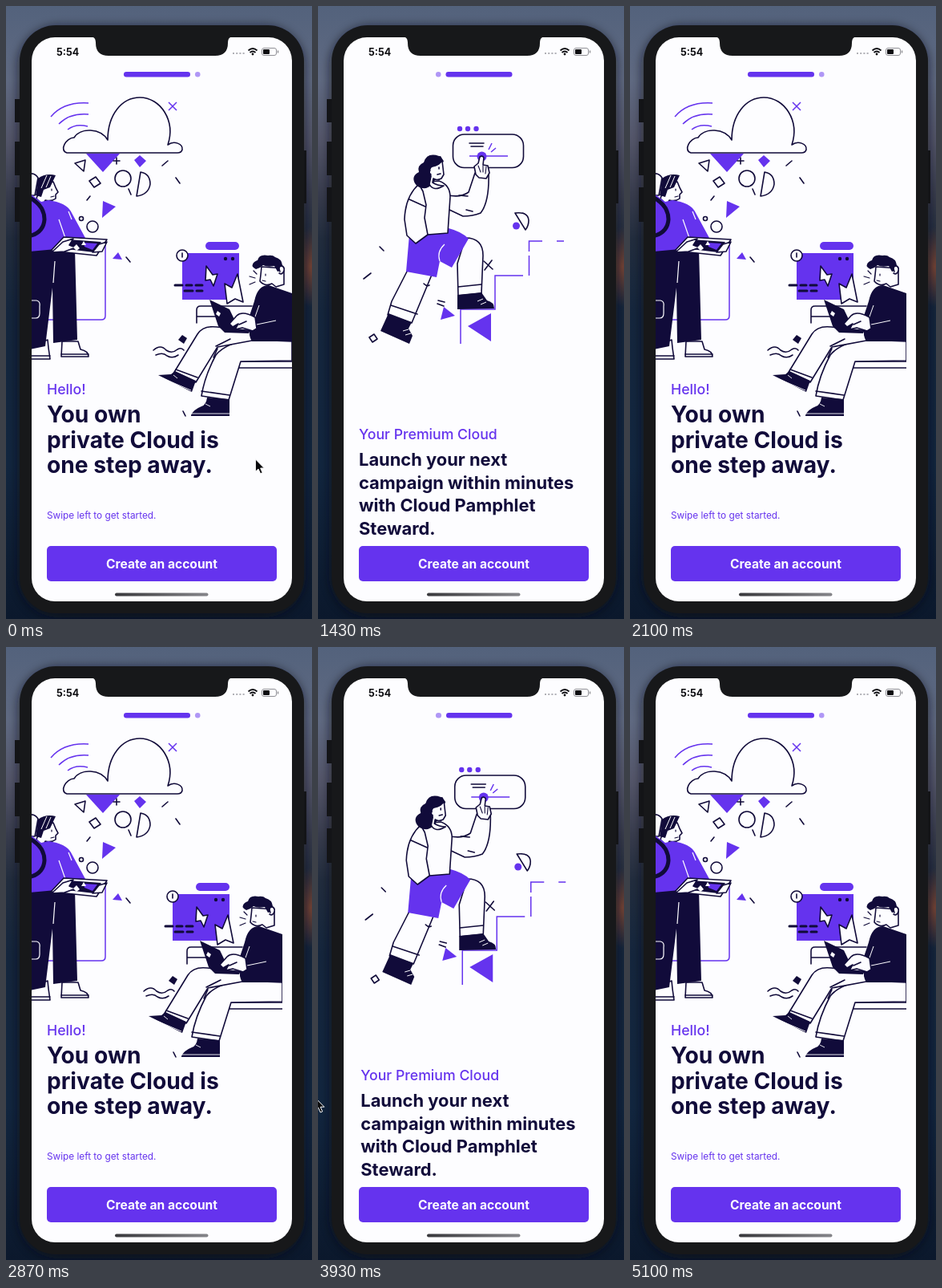
An HTML page for the animation above (5.17 s loop, 382 by 764 pixels).

```html
<!DOCTYPE html>
<html lang="en">
<head>
<meta charset="utf-8">
<title>Onboarding swipe</title>
<style>
  html, body { margin: 0; width: 100%; height: 100%; overflow: hidden; background: #14243c; }
  svg { display: block; width: 382px; height: 764px; font-family: Inter, sans-serif; }
  .line { fill: none; stroke: #110b3a; stroke-width: 1.6; stroke-linecap: round; stroke-linejoin: round; }
  .shape { fill: #fdfdff; stroke: #110b3a; stroke-width: 1.6; stroke-linejoin: round; }
  .ink { fill: #110b3a; }
  .violet { fill: #6533ee; }
  .trace { fill: none; stroke: #6533ee; stroke-width: 1.5; }
  .paper { fill: none; stroke: #fdfdff; stroke-width: 1.2; }
  .white { fill: #fdfdff; }
  .title { font-weight: 700; font-size: 28.2px; fill: #110b3a; }
  .copy { font-weight: 700; font-size: 21.9px; fill: #110b3a; }
  .lead { font-weight: 500; font-size: 17.7px; fill: #6533ee; }
</style>
</head>
<body>
<svg viewBox="0 0 382 764">
  <defs>
    <linearGradient id="sky" x2="0" y2="1">
      <stop offset="0" stop-color="#53627c"/>
      <stop offset=".12" stop-color="#606a82"/>
      <stop offset=".22" stop-color="#535569"/>
      <stop offset=".31" stop-color="#373b4c"/>
      <stop offset=".38" stop-color="#222d3e"/>
      <stop offset=".5" stop-color="#15263d"/>
      <stop offset=".75" stop-color="#12263f"/>
      <stop offset="1" stop-color="#0b182c"/>
    </linearGradient>
    <linearGradient id="metal">
      <stop offset="0" stop-color="#38383c"/>
      <stop offset="1" stop-color="#85858a"/>
    </linearGradient>
    <radialGradient id="glow">
      <stop offset="0" stop-color="#8a4a34"/>
      <stop offset="1" stop-color="#8a4a34" stop-opacity="0"/>
    </radialGradient>
    <filter id="blur"><feGaussianBlur stdDeviation="6"/></filter>
    <clipPath id="screen"><rect x="32" y="39" width="325" height="703" rx="29"/></clipPath>
    <clipPath id="seat"><path d="M170 280H357V530H170Z"/></clipPath>
  </defs>

  <rect width="382" height="764" fill="url(#sky)"/>
  <ellipse cx="380" cy="325" rx="22" ry="50" fill="url(#glow)" opacity=".8"/>
  <rect x="14" y="24" width="360" height="738" rx="52" fill="#0b0d12" opacity=".55" filter="url(#blur)"/>
  <path d="M11 116h8v29h-8zM11 169h8v42h-8zM11 226h8v43h-8zM369 180h6v66h-6z" fill="#131417"/>
  <rect x="17" y="24" width="355" height="733" rx="45" fill="#17181a"/>
  <rect x="32" y="39" width="325" height="703" rx="29" class="white"/>

  <g clip-path="url(#screen)">
    <g id="first">
      <!-- cloud and falling shapes -->
      <path class="line" d="M76 183C66 180 75 164 85 164C93 151 118 152 127 167C127 135 145 114 167 114C193 114 212 143 202 173C210 167 221 172 220 179Q219 183 214 183Z"/>
      <path class="trace" d="M56 138Q72 119 103 121M66 147Q80 133 103 135M77 154Q87 146 102 150M203 120l10 10M213 120l-10 10"/>
      <path class="violet" d="M100 184h42l-21 23zM160 192l7-6 8 7-8 8zM121 243l16 7-17 14zM133 315l7-8 5 9z"/>
      <path class="line" d="M86 196l13-4-2 14zM104 218l8-5 6 8-8 5zM168 207Q180 209 180 222Q178 235 163 237ZM134 193h8M138 189v8M195 199l7-6M212 214l5 7M153 228l3 7M101 242l4-5M150 313l5 6"/>
      <circle class="line" cx="146" cy="215" r="10"/>
      <circle class="line" cx="108" cy="275" r="7"/>
      <circle class="line" cx="94" cy="265" r="2.5"/>

      <!-- standing figure -->
      <path class="trace" d="M124 298V386q0 5-5 5H32"/>
      <path class="shape" d="M30 424l22-8 1 10 2 14H30zM70 418h20l3 10q10 2 10 9H69z"/>
      <path class="line" d="M69 434h34M30 436h25"/>
      <path class="ink" d="M30 303h56l3 113-30 4-1-69-9 73-19 4z"/>
      <path class="paper" d="M59 345l2-27M30 367h8q5 1 4 7v9q0 6-5 6h-7"/>
      <path class="shape" d="M30 209q6-1 10 5l-4 22h-6z"/>
      <path class="shape" d="M44 222l15-3q3 8 6 13l-3 3v5q-5 4-13 2l-3 6-8-8z"/>
      <path class="line" d="M57 228v2M56 238l4-1" style="stroke-width:1.2"/>
      <path class="ink" d="M37 236l3-21q9-7 22-4l-7 15-8 3-3 9z"/>
      <path class="paper" d="M44 227l7-16M50 226l6-14" style="stroke-width:1"/>
      <path class="violet" d="M30 234l14 10 9-2q22 3 28 14l18 33-23 9-14 5-32 3z"/>
      <path class="paper" d="M66 266l8 23M78 256l4 10"/>
      <path class="line" d="M30 239q18 10 18 27-1 15-16 20" style="stroke-width:5"/>
      <path class="shape" d="M56 305l16-17 54 3-13 20z"/>
      <path class="ink" d="M68 302l10-11 41 3-9 13z"/>
      <path class="violet" d="M97 295l17 1-6 8-10-4z"/>
      <path class="shape" d="M57 307l14-13 13-4-5 8 8 3-14 5zM108 307l8-10 10-3-6 12z"/>
      <path class="white" d="M84 301l4-4 4 5-4 3zM94 298l3-5 3 5z"/>

      <!-- seated figure, drifting against the page -->
      <g id="sitter"><g clip-path="url(#seat)">
        <rect class="violet" x="249" y="294" width="42" height="10" rx="5"/>
        <path class="violet" d="M220 308h71v58h-71z"/>
        <circle class="shape" cx="220" cy="311" r="7"/>
        <path class="line" d="M220 308v5"/>
        <circle class="ink" cx="274" cy="315" r="2.2"/><circle class="ink" cx="283" cy="315" r="2.2"/>
        <path class="line" d="M211 348h9M225 348h7M237 348h8M223 355h10M238 355h7" style="stroke-width:3"/>
        <path class="shape" d="M250 324l8 11 6-1-5 15-4-8-6 1z"/>
        <path class="shape" d="M289 334l7 35-10-4-10 6-3-25 9 5z"/>
        <path class="line" d="M238 395V379q0-5 5-5h64M238 387h24"/>
        <path class="line" d="M304 337l7 2M304 347l7-3M309 330l4 4" style="stroke-width:1.2"/>
        <path class="line" d="M184 429q9-8 16 0 7 5 14-1 5-3 8 1M187 435q9-4 14 1 7 4 14-1"/>
        <path class="ink" d="M215 416l5-6 6 4-4 7z"/>
        <path class="line" d="M221 505l3 6M294 443h63M290 451h67"/>
        <path class="shape" d="M357 418l-49-2q-33 3-46 19-14 26-18 51l34 5 15-48 64-1z"/>
        <path class="shape" d="M308 405l-45-5q-17-2-24 9l-30 49 28 11 27-44 43-8z"/>
        <path class="line" d="M262 424l18-9M259 438l5-11M244 480l35 5M212 453l27 10"/>
        <path class="ink" d="M190 460l16-1 5-4 26 12-5 14zM231 510q3-7 13-11 6-2 7-11l28 2v21h-48z"/>
        <path class="paper" d="M209 460l5 4M249 496l6 3M191 462l40 17M232 508h47" style="stroke-width:.9"/>
        <path class="ink" d="M310 368q4-20 18-20l29 10v60h-50q-5-8-2-18l-2-11z"/>
        <path class="shape" d="M319 325q-1 11-2 18 6 7 15 3l5 4 10-3v-20z"/>
        <path class="ink" d="M312 328q-8-4-2-9 3-2 4-2 2-8 13-6 6-1 9 2 8 2 9 10l-2 7-4 1-4-7q-9 2-14-1-4 4-9 5z"/>
        <path class="line" d="M342 331q-3-7 3-7 4 3 1 8-2 3-5 1" style="fill:#fdfdff"/>
        <path class="line" d="M324 334v2M320 342l4 1" style="stroke-width:1.2"/>
        <path class="paper" d="M316 373l-6 17M313 397l24-5" style="stroke-width:1"/>
        <path class="ink" d="M254 366l25 12 12 25 14 1-2 4-30-1-8-8z"/>
        <path class="white" d="M264 380l4 3-2 4-4-3z"/>
        <path class="shape" d="M311 388q-16-9-23-2l-9 10 4 4 7-4-4 7 9-2 13 4 5-3z"/>
        <path class="line" d="M291 397l9-4"/>
      </g></g>

      <text class="lead" x="51" y="484">Hello!</text>
      <g class="title">
        <text x="51" y="519">You own</text>
        <text x="51" y="551">private Cloud is</text>
        <text x="51" y="582">one step away.</text>
      </g>
      <text x="51" y="639" class="violet" font-size="11.8">Swipe left to get started.</text>
    </g>

    <g id="second">
      <g class="violet">
        <circle cx="177" cy="153" r="3.2"/><circle cx="187" cy="153" r="3.2"/><circle cx="197.5" cy="153" r="3.2"/>
        <circle cx="247.5" cy="274" r="4.5"/>
        <path d="M187 399l29-16v35zM153 391l4-16 14 11z"/>
      </g>
      <rect class="shape" x="168.5" y="160" width="88" height="41.5" rx="14"/>
      <path class="line" d="M189 171h18M191 175h15"/>
      <path class="trace" d="M189 187h48M213 179l4-8M216 182l6-5"/>
      <path class="trace" d="M178 421V378H221V336H256M263.5 336V311M263.5 306V293H280M298 293h9"/>
      <path class="line" d="M246 258Q262 256 263 267Q263 274 259 279ZM207 318l11 10M217 317l-9 12M77 300l5 5M57 340l9-7M64 413l6-4 4 6-6 4zM150 367l8 2M149 371l8 3"/>

      <!-- climbing figure -->
      <path class="shape" d="M112 329l-20 39-5 17 30 10 10-24 15-36z"/>
      <path class="line" d="M91 373l33 11M132 346q4 4 7 2"/>
      <path class="ink" d="M88 383l29 11-4 8 5 9-4 10-36-16z"/>
      <path class="paper" d="M106 405l7-2M109 410l7-2" style="stroke-width:1"/>
      <path class="shape" d="M184 289q22 0 22 22l-2 47-29 3-1-40z"/>
      <path class="line" d="M175 350l29-3"/>
      <path class="ink" d="M174 360l30-3 7 10q9 2 9 10l-46 1z"/>
      <path class="paper" d="M199 368l7-3M203 372l7-3" style="stroke-width:1"/>
      <path class="violet" d="M114 285l-4 46 38 7 4-20 15 8 21-36q-9-9-25-13z"/>
      <path class="paper" d="M152 318q-4-12 6-21"/>
      <path class="shape" d="M160 235q17 5 28-3l8-24 17 1q1 35-10 49-10 4-22 4l-19-9z"/>
      <path class="line" d="M187 237l-11-1M193 256l-8-2"/>
      <path class="shape" d="M128 220l23-2q14 5 14 20l-3 45-38 3-8-41z"/>
      <path class="shape" d="M126 222q-17 15-18 44l3 20 11 10 15-11-4-21 2-16-4-17z"/>
      <path class="line" d="M114 241l20 9"/>
      <path class="ink" d="M151 187q-15-5-19 8-9 4-6 12-10 5-5 14 4 7 14 6 6-2 10-8l12-26z"/>
      <path class="shape" d="M143 199l12-6 2 17-3 5q-6 3-10 0l-1 5q6 4 14 4-13 8-18-2l2-10q-5-7 2-13z"/>
      <path class="ink" d="M138 199q4-12 15-12l3 5q-3 7-14 9z"/>
      <path class="line" d="M151 201v2M149 210l4-1M140 205q-3 3 1 5"/>
      <circle class="violet" cx="204.5" cy="187.5" r="6"/>
      <path class="shape" d="M197 210l-2-10 5-4 2-8q3-2 5 1l-1 9 6 1 2 9-4 7-9-1z"/>
      <path class="line" d="M200 199l3 8M206 199v8M210 200l-1 9" style="stroke-width:1.1"/>

      <text class="lead" x="51" y="540">Your Premium Cloud</text>
      <g class="copy">
        <text x="51" y="573">Launch your next</text>
        <text x="51" y="601.5">campaign within minutes</text>
        <text x="51" y="630">with Cloud Pamphlet</text>
        <text x="51" y="658.5">Steward.</text>
      </g>
    </g>

    <rect id="barA" class="violet" x="147" y="82" height="6.4" rx="3.2"/>
    <rect id="barB" class="violet" y="82" height="6.4" rx="3.2"/>
    <rect class="violet" x="51" y="673" width="287" height="44" rx="5"/>
    <text x="194.5" y="700.5" text-anchor="middle" class="white" font-size="15.6" font-weight="700">Create an account</text>
    <rect x="136" y="731.5" width="116.5" height="4" rx="2" fill="url(#metal)"/>
  </g>

  <!-- notch and status bar -->
  <path d="M106 38q6 1 6 7v1q0 16 16 16H261q16 0 16-16v-1q0-6 6-7z" fill="#17181a"/>
  <text x="63" y="61.5" fill="#0c0c10" font-size="12.5" font-weight="700">5:54</text>
  <path d="M283 59h15" stroke="#b0b0b6" stroke-width="2" stroke-dasharray="2 2.2"/>
  <path d="M302.5 55.5q5.500-5 11 0M304.5 58q3.500-3 7 0" fill="none" stroke="#0c0c10" stroke-width="1.8"/>
  <circle cx="308" cy="60" r="1.4" fill="#0c0c10"/>
  <rect x="319.5" y="52.5" width="18" height="9" rx="2.5" fill="none" stroke="#909096"/>
  <rect x="321" y="54" width="8" height="6" rx="1" fill="#0c0c10"/>
  <path d="M339.5 55.5v3" stroke="#909096" stroke-width="1.5"/>

  <path id="pointer" d="M0 0V15.5L3.600 12.200L6.200 18L8.800 16.900L6.300 11.200H11Z" fill="#0a0a0c" stroke="#fdfdff"/>
</svg>
<script>
  const LOOP = 5170, PAGE = 325, PRESS = 60, TRAVEL = 560;
  // Start time and direction of each swipe
  const swipes = [[0, 1], [1426, -1], [3350, 1], [4280, -1]];
  // Time, x, y of the mouse pointer
  const route = [
    [0, 312, 565], [150, 222, 537], [580, -3, 562], [660, -20, 565],
    [1440, -20, 570], [1760, 400, 560], [3180, 400, 575],
    [3350, 312, 565], [3500, 222, 537], [3930, -3, 562], [4010, -20, 565],
    [4290, -20, 570], [4610, 400, 560], [LOOP, 400, 560]
  ];
  const $ = id => document.getElementById(id);
  const clamp = v => Math.min(1, Math.max(0, v));
  const glide = x => 1 - (1 - x ** 1.53) ** 2.2;
  const set = (id, attrs) => {
    for (const key in attrs) $(id).setAttribute(key, attrs[key]);
  };
  const move = (id, x, y = 0) => set(id, { transform: `translate(${x} ${y})` });

  function pageAt(t) {
    return swipes.reduce((sum, [start, dir]) =>
      sum + dir * glide(clamp((t - start - PRESS) / TRAVEL)), 0);
  }

  function pointerAt(t) {
    const i = route.findIndex(stop => stop[0] > t);
    const [t0, x0, y0] = route[i - 1], [t1, x1, y1] = route[i];
    const k = (t - t0) / (t1 - t0);
    return [x0 + (x1 - x0) * k, y0 + (y1 - y0) * k];
  }

  function draw(t) {
    const page = clamp(pageAt(t));
    // The sitter rests in place until the first swipe begins
    const drift = t < PRESS ? 0 : -33.5 + 21.5 * Math.exp(-25 * page);
    move('first', -page * PAGE);
    move('second', (1 - page) * PAGE);
    move('sitter', drift);
    move('pointer', ...pointerAt(t));
    const wide = 83 - 76.5 * page, other = 6.5 + 76.5 * page;
    set('barA', { width: wide, 'fill-opacity': 1 - .5 * page });
    set('barB', { x: 242.5 - other, width: other, 'fill-opacity': .5 + .5 * page });
  }

  const begin = performance.now();
  function tick() {
    draw((performance.now() - begin) % LOOP);
    requestAnimationFrame(tick);
  }
  tick();
</script>
</body>
</html>
```
